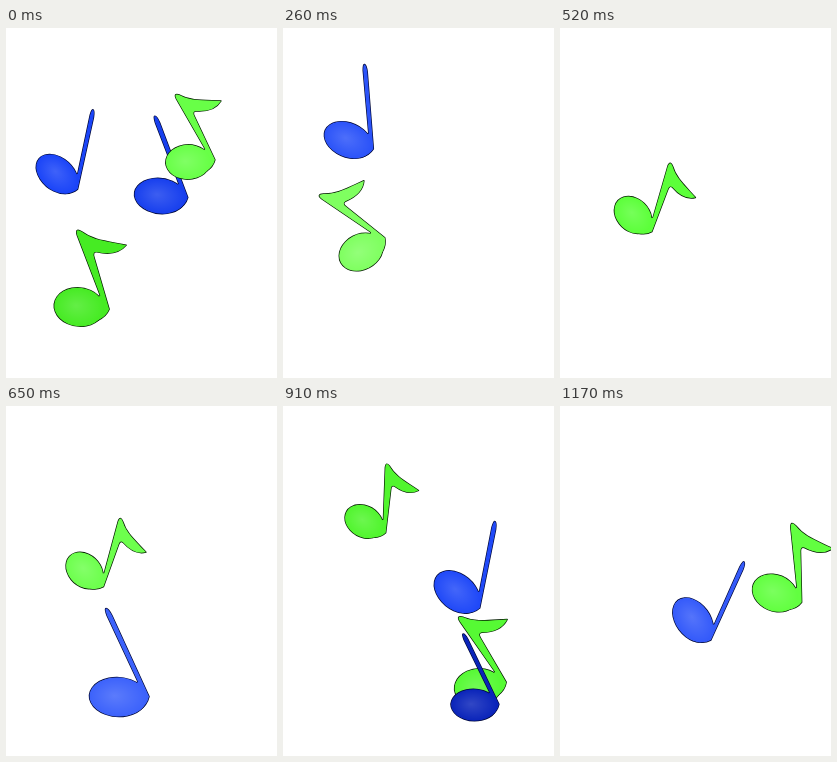
An HTML page with a canvas that plays this animation: 271x350 px, repeating every 1.3 s.

```html
<!DOCTYPE html>
<html>
<head>
<meta charset="utf-8">
<title>Floating notes</title>
<style>
html, body { margin: 0; width: 100%; height: 100%; overflow: hidden; background: #fff; }
canvas { display: block; }
</style>
</head>
<body>
<canvas id="stage" width="271" height="350"></canvas>
<script>
const ctx = document.getElementById('stage').getContext('2d');
const STEP = 130, STEPS = 10;

// Note space: origin = head centre, (1,0) = foot of the stem, (1,1) = top of the stem.
const disc = new Path2D();
disc.arc(0, 0, 1, 0, 7);
const foot = 'M1 0 Q.8 -.1 .45 -.16 L.6 .1 L.876 .17 ';
const kinds = {
  blue: {
    stem: new Path2D(foot + 'L.92 .93 Q.95 1.01 1 1.01 Q1.07 1.01 1.08 .93 Z'),
    head: [.949, .058, 0, .216, 0, 0],
    headReach: .32,
    ramp: [[0, 14, 145], [26, 68, 248], [112, 142, 255]],
    line: '#000838'
  },
  green: {
    stem: new Path2D(foot + 'L.88 .94 Q.9 1.04 1.08 .99 C1.35 .89 1.75 .89 2.42 .857' +
      'Q1.95 .7 1.33 .74 Q1.17 .74 1.16 .66 Z'),
    head: [.866, .081, 0, .24, 0, 0],
    headReach: .36,
    ramp: [[36, 205, 0], [92, 255, 58], [150, 255, 122]],
    line: '#041c00'
  }
};

// Waypoints are [head x, head y, lean in degrees], `gap` steps apart, back to front.
// Stem length and tone run evenly along the whole path.
const notes = [
  { kind: 'blue', start: 6, length: [68], tone: [0],
    path: [[175, 289, 29]] },
  { kind: 'blue', start: 9, length: [84, 87], tone: [.65, .45],
    path: [[133, 214, 23], [154, 168, -22]] },
  { kind: 'green', start: 6, length: [77, 82, 75], tone: [.4, .6],
    path: [[181, 311, -42], [195, 281, -35], [204, 230, -20], [215, 187, -6], [182, 134, -30]] },
  { kind: 'blue', start: 7, length: [78, 74], tone: [.2, .45],
    path: [[191, 299, -27], [184, 250, -47]] },
  { kind: 'green', start: 0, gap: 2, length: [84, 70, 67], tone: [.3, .8, .5, .8, 0],
    path: [[73, 279, -21], [78, 224, -56], [73, 187, 16], [84, 142, 14], [78, 89, -10]] },
  { kind: 'blue', start: 5, length: [97, 82], tone: [.7, .45],
    path: [[112, 291, -26], [138, 260, -27], [174, 186, 10], [199, 126, 16]] },
  { kind: 'blue', start: 0, gap: 2, length: [80, 84], tone: [.5, .6],
    path: [[51, 146, 11], [65, 112, -6]] }
];

const lerp = (a, b, t) =>
  Array.isArray(a) ? a.map((v, i) => lerp(v, b[i], t)) : a + (b - a) * t;

// Value at t (0..1) along evenly spaced stops
function along(stops, t) {
  const at = t * (stops.length - 1), i = Math.floor(at);
  return lerp(stops[i], stops[Math.min(i + 1, stops.length - 1)], at - i);
}

function place(path, matrix) {
  const placed = new Path2D();
  placed.addPath(path, matrix);
  return placed;
}

function drawNote({ kind, path, length, tone }, t) {
  const { stem, head, headReach, ramp, line } = kinds[kind];
  const [x, y, lean] = along(path, t);
  const long = along(length, t), reach = long * headReach;
  const up = lean * Math.PI / 180, side = up + .44;
  const space = new DOMMatrix([
    reach * Math.cos(side), reach * Math.sin(side),
    long * Math.sin(up), -long * Math.cos(up), x, y]);
  const headSpace = space.multiply(new DOMMatrix(head));
  const parts = [place(stem, space), place(disc, headSpace)];

  ctx.lineJoin = 'round';
  ctx.lineWidth = 1.4;
  ctx.strokeStyle = line;
  parts.forEach(part => ctx.stroke(part));
  ctx.fillStyle = `rgb(${along(ramp, along(tone, t))})`;
  parts.forEach(part => ctx.fill(part));

  const shine = ctx.createRadialGradient(-.1, .1, 0, 0, 0, 1);
  shine.addColorStop(0, 'rgba(255,255,255,.16)');
  shine.addColorStop(1, 'rgba(255,255,255,0)');
  ctx.save();
  ctx.transform(headSpace.a, headSpace.b, headSpace.c, headSpace.d, x, y);
  ctx.fillStyle = shine;
  ctx.fill(disc);
  ctx.restore();
}

function frame() {
  const step = Math.floor(performance.now() / STEP) % STEPS;
  ctx.fillStyle = '#fff';
  ctx.fillRect(0, 0, 271, 350);
  for (const note of notes) {
    const span = (note.path.length - 1) * (note.gap || 1);
    const age = (step - note.start + STEPS) % STEPS;
    if (age <= span) drawNote(note, span ? age / span : 0);
  }
  requestAnimationFrame(frame);
}
frame();
</script>
</body>
</html>
```
